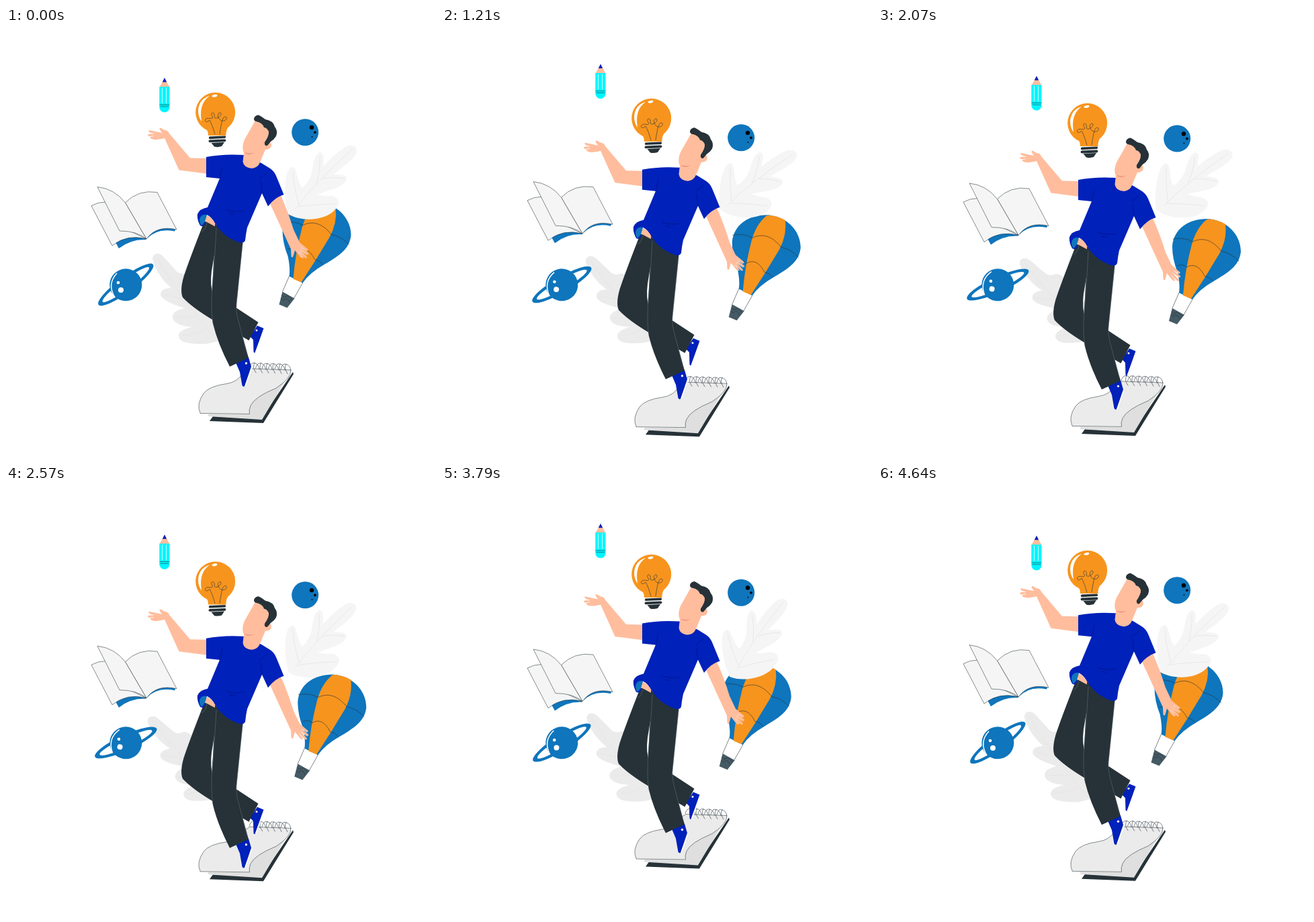
An HTML page for the animation above (4710 ms loop, 640 px wide and 640 px high).

```html
<!DOCTYPE html>
<html lang="en">
<head>
<meta charset="utf-8">
<title>Floating ideas</title>
<style>
  html, body { margin: 0; width: 100%; height: 100%; overflow: hidden; background: #fff; }
  svg { display: block; width: 100vw; height: 100vh; }
  .ink { fill: none; stroke: #263238; stroke-width: .6; stroke-linecap: round; }
  .vein { fill: none; stroke: #e3e3e3; stroke-width: .7; }
  .edge { stroke: #263238; stroke-width: .55; stroke-linejoin: round; }
  .blue { fill: #0f75bc; }
  .navy { fill: #0021ba; }
  .dark { fill: #263238; }
  .skin { fill: #ffbd9d; }
  .gold { fill: #f7941d; }
  .white { fill: #fff; }
</style>
</head>
<body>
<svg viewBox="0 0 640 640">
  <g id="leafL">
    <path fill="#ebebeb" d="M218 344C218 335 227 333 234 340L254 362Q257 366 264 366Q272 363 278 369L300 395L316 440Q321 458 317 465Q302 472 282 470C262 469 256 463 257 456C259 450 268 447 278 445C258 444 247 437 248 429C249 422 258 419 266 417C247 411 230 404 230 396C231 389 238 387 246 387Q225 369 218 344Z"/>
    <path class="vein" d="M225 342Q252 392 312 462M262 403L234 396M282 430L252 431M296 448Q280 458 262 457"/>
  </g>

  <g id="balloon"><g transform="translate(-26.500 -24.500)">
    <path class="blue" d="M448 394Q450 383 446 364Q438 344 438 325C440 299 462 284 490 284C520 286 540 308 540 333C538 354 521 364 501 376Q478 389 468 404Z"/>
    <path class="gold" d="M454 398Q457 360 467 322Q474 297 490 284.500Q505 284.500 517 292Q520 314 508 336Q488 370 466 403Z"/>
    <path class="ink" d="M439 314Q456 311 468 318Q491 307 511 332Q526 335 537 347M446 354Q454 350 459 356Q475 347 486 369Q493 370 498 376M448 394L438 417M468 404L455 427"/>
    <path fill="#455a64" d="M438 417L456 427L445 441L433 436Z"/>
    <path class="ink" d="M437 422Q440 427 443 424T452 429M436 427Q439 431 442 428T449 433"/>
  </g></g>

  <g id="leafR">
    <path fill="#f5f5f5" d="M420 277C413 255 413 207 427 207C434 209 433 230 441 238Q453 228 456 210C458 194 463 184 468 185C475 187 472 198 472 206Q488 188 505 177C514 172 523 175 522 184C518 197 500 207 487 218C500 218 508 219 507 225C503 236 485 240 463 248Q475 251 484 250C498 252 498 263 490 270C476 287 440 289 420 277Z"/>
    <path class="vein" d="M430 270Q462 228 516 180M436 263Q428 236 427 213M462 231Q468 212 467 191M470 224Q488 221 504 224M434 266Q462 262 490 262"/>
  </g>

  <g id="pad">
    <path class="dark" d="M427 512L428 515L383 588L303 585L308 578L380 581Z"/>
    <path fill="#dfdfdf" d="M424 511L381 583L301 578L301 570L362 560Z"/>
    <path class="white" d="M289 573L362 574L362 575L301 574.500Z"/>
    <path class="edge" fill="#ebebeb" d="M289 573Q283 560 294 544Q302 533 328 529.500Q345 527 352 514L363 507L424 509Q425 521 402 536Q370 549 364 562Q361 569 362.500 574.500L289 573.500Z"/>
    <path id="rings" class="ink"/>
  </g>

  <g id="book">
    <path class="blue" d="M163 319L168 328Q186 314 208 315L209 313Q184 307 163 319ZM209 314Q225 297 251 302.500L253 298Q224 292 209 314Z"/>
    <path class="edge" fill="#f5f5f5" d="M127 264.500Q137 259 148 259L180 300L209 314Q180 306 158 324Z"/>
    <path class="edge" fill="#f5f5f5" d="M177.500 260Q197 240 225 244.500L254 300Q224 293 209 314Z"/>
    <path class="edge" fill="#f5f5f5" d="M136 236.500Q161 239 177.500 260L209 314Q195 302 169 302Z"/>
  </g>

  <g id="saturn">
    <g transform="translate(178.300 382) rotate(-36.500)">
      <path class="blue" fill-rule="evenodd" d="M-50.500 0A50.500 11.500 0 0 1 50.500 0A50.500 11.500 0 0 1 -50.500 0ZM-43 0A43 7 0 0 0 43 0A43 7 0 0 0 -43 0Z"/>
    </g>
    <circle class="blue" cx="178.300" cy="382.300" r="24"/>
    <path fill="none" stroke="#fff" stroke-width="1.500" d="M162 401Q150 381 165 365"/>
    <circle class="white" cx="167" cy="379" r="2.300"/>
    <circle class="white" cx="171" cy="390" r="4"/>
  </g>

  <g id="moon">
    <circle class="blue" cx="445.200" cy="155.200" r="20"/>
    <circle cx="455" cy="148" r="3.200"/><circle cx="460" cy="155.300" r="1.900"/><circle cx="455.500" cy="162" r=".9"/>
  </g>

  <g id="pencil">
    <path class="skin" d="M228.500 88L234 78H238L243.500 88Z"/>
    <path class="navy" d="M236 74L239.200 80.500H232.800Z"/>
    <path fill="#00f6ff" d="M228.300 87.500H243.500V118A7.600 7.600 0 0 1 228.300 118Z"/>
    <path fill="none" stroke="#fff" stroke-width=".8" d="M232.500 89V112M238.500 89V112"/>
    <path class="ink" d="M229 114.300H243M230 117H242"/>
  </g>

  <g id="bulb">
    <circle class="gold" cx="311.700" cy="125.500" r="29.500"/>
    <path class="gold" d="M296 148Q301 152 301 160H327.500Q327 153 331 147Z"/>
    <path class="dark" d="M303 161.500L326 160.500Q328.500 162 326 164L303 165.200Q300.500 163.500 303 161.500ZM303 166.500L326 165.500Q329 167 326 169.300L303 170.300Q300 168.500 303 166.500ZM305.500 171L325 170L321 176Q315 178 310 176.500Z"/>
    <path class="white" d="M291 139C281 124 287 105 303 101C292 109 288 121 291 139Z"/>
    <ellipse class="white" cx="310.500" cy="101" rx="4" ry="1.900" transform="rotate(-10 310 101)"/>
    <path class="ink" d="M311 158Q307 144 303 137C299 142 295 139 297 136C300 132 306 137 308 133C303 127 308 124 310 128C311 132 309 135 314 134C320 132 322 126 318 126C314 128 315 133 318 136C322 141 330 137 328 133C324 130 322 136 321 141Q319 150 318 158"/>
  </g>

  <g id="man">
    <path class="navy" d="M374 443L383.500 447L371 483Q369 484 368.500 482L368 464L363 459Z"/>
    <path class="navy" d="M342 498L361 490L365 504L355.500 533Q353 535 351.500 532L348 512Z"/>
    <path fill="none" stroke="#fff" stroke-width="1.800" d="M384.500 448L371.500 483M366 505L356 533"/>
    <circle class="white" cx="373" cy="450" r="1.500"/><circle class="white" cx="357.500" cy="499" r="1.700"/>

    <path class="skin" d="M294 277L313 290L310 296L293 291Z"/>
    <path class="dark" d="M295.500 287Q272 347 264.500 370Q258.500 391 263 401Q277 416 307 434L361.500 465L375.500 438L342 416L315 400L306.500 391Q303 374 308 350L316 298Z"/>
    <path class="dark" d="M311 291Q310 340 306.500 392Q305 428 308 440Q315 469 333 504L361 491L347 440Q342 424 343 412L352.500 319Q330 312 311 291Z"/>
    <path fill="none" stroke="#67757c" stroke-width=".5" d="M313 298Q311 340 306.500 392Q305 425 308 438M352 322L343 411Q342 424 347 440L359 486M299 290Q297 301 291 303"/>

    <path class="skin" d="M300 194L274 193.500L243 157Q241 152 236 152L230 148.500Q227 149 230 153L232 156Q222 154 213 152Q211 153 214 155.500L219 157Q211 157 211 160Q213 162 216 161Q213 163 216 164.500Q221 168 236 164L257.500 211.500L300 217Z"/>
    <path fill="none" stroke="#fff" stroke-width=".8" d="M211 157L220 157.500M212 162L220 160.500"/>

    <path class="skin" d="M391 257L408 247Q420 273 428 300L437 319L449 329Q451 331 448 331.500L441 328L450 335Q451 338 448 337L440 332L448 341Q448 344 445 342L437 335L442 341Q442 344 438 341L430 331L427.500 340Q425 343 424.500 339L424 329Z"/>
    <path fill="none" stroke="#fff" stroke-width=".6" d="M440 327L448 332M438 330L448 338M436 333L443 342"/>

    <path class="navy" d="M298 192Q324 187 354 189L380 201L393 209Q399 213 402 220L413.500 248Q400 252 390 265.500L381 246L359 297Q357 306 356 316Q354 321 347 319Q325 312 312 292Q306 281 299 278Q296 284 296 292Q293 297 289 294Q284 285 285 277Q288 269 300 267L318 224L298 222Z"/>
    <path class="blue" d="M299 278Q290 276 288 285Q288 291 291 294Q296 291 299 278Z"/>
    <path class="skin" d="M300 279Q307 283 311 291L296 288Z"/>
    <path fill="none" stroke="#001270" stroke-width=".6" d="M318 224L322 207M381 246L379 228M377 225L389 215M327 270Q339 275 353 272M332 276L340 277"/>

    <path class="skin" d="M372 136L355 166Q350 178 354 186L352.500 199Q354 208 366 209Q375 208 378 200L386 181Q395 181 395 174Q394 169 390 170L393 148L383 138Z"/>
    <path fill="#eb9481" d="M356 185Q363 188 370 185Q364 190 357 187Z"/>
    <path class="dark" d="M369 135Q370 130 376 129.500Q381 132 386 136Q398 138 400 147Q405 153 402 161Q399 166 394 169L389 175Q384 176 385 170Q392 160 391 154Q388 148 384 148Q382 141 372 139Q369 138 369 135Z"/>
  </g>
</svg>
<script>
const LOOP = 4710, FPS = 14;
const $ = id => document.getElementById(id);

$('rings').setAttribute('d', [365, 374.5, 384, 393.5, 403, 412].map((x, i) =>
  `M${x - 3} ${506 + i * .4}Q${x - 1} 498 ${x + 5} ${498.5 + i * .4}Q${x + 11} ${500 + i * .4} ${x + 12} ${508 + i * .3}` +
  `M${x + 5} ${498.5 + i * .4}Q${x + 1} 505 ${x + 7} ${513 + i * .3}`).join(''));

// Eased value at t through [time, value] keys; rest is 0 at both loop ends.
function track(keys, t, linear = 0) {
  let a = [0, 0];
  for (const b of [...keys, [LOOP, 0]]) {
    if (t <= b[0]) {
      const p = (t - a[0]) / (b[0] - a[0]);
      const s = .5 - .5 * Math.cos(Math.PI * p);
      return a[1] + (b[1] - a[1]) * (s + (p - s) * linear);
    }
    a = b;
  }
  return 0;
}

const move = (id, x, y) => $(id).setAttribute('transform', `translate(${x} ${y})`);
const turn = (id, deg, x, y) => $(id).setAttribute('transform', `rotate(${deg} ${x} ${y})`);

function draw(t) {
  const sway = track([[LOOP / 2, 1]], t, .2);
  const drift = track([[1820, 1]], t);
  move('man', 0, 36 * sway);
  move('bulb', 0, 17 * sway);
  turn('saturn', 12.4 * sway, 178.3, 382.3);
  turn('leafL', -7.8 * sway, 275, 403);
  move('balloon', 27 * drift, 25 * drift);
  move('pencil', 0, -10.25 * (1 - Math.cos(4 * Math.PI * t / LOOP)));
  move('moon', 0, track([[1700, 10], [3430, 4.3]], t));
  move('pad', 0, track([[1680, 24.5], [3430, -22.5]], t));
  move('book', 0, track([[1550, -8.8], [3350, 8.5]], t));
  turn('leafR', track([[1670, 10], [3430, -11]], t), 468, 228);
}

const start = performance.now();
function tick(now) {
  const t = Math.max(0, now - start) % LOOP;
  draw(Math.min(LOOP, Math.floor((t + 5) * FPS / 1000) * 1000 / FPS));
  requestAnimationFrame(tick);
}
draw(0);
requestAnimationFrame(tick);
</script>
</body>
</html>
```
